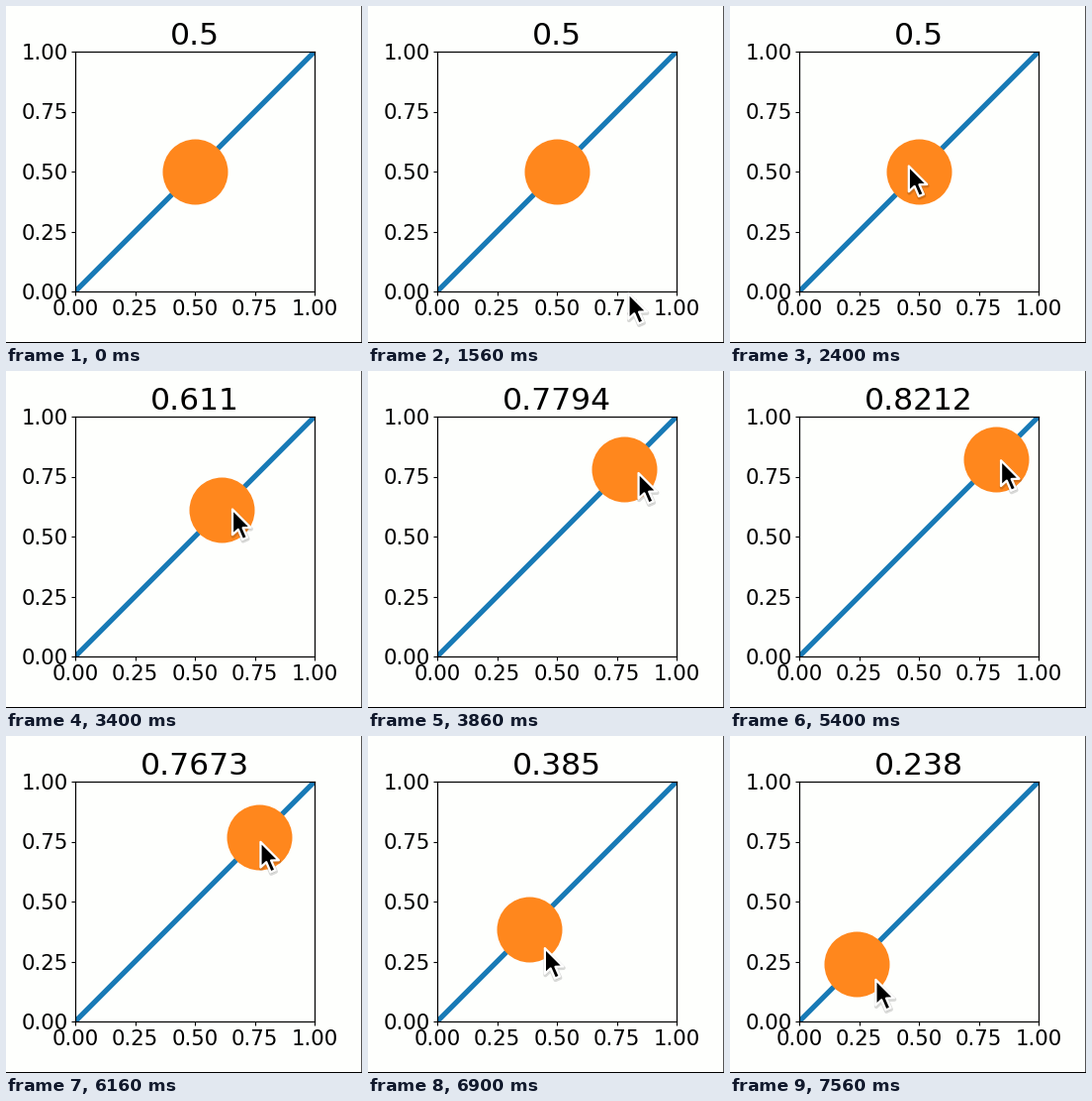
A matplotlib script that plays this animation: 360 by 340 pixels, repeating every 8 s.

```python
import numpy as np
import matplotlib.pyplot as plt
from matplotlib.animation import FuncAnimation
from matplotlib.patches import Polygon

WIDTH, HEIGHT, DPI = 360, 340, 72  # at 72 dpi one point is one pixel
LEFT, BOTTOM, SIDE = 70, 288, 242  # plot square, y measured downwards
LOOP, INTERVAL = 8000, 20
PAPER, BLUE, ORANGE = "#fefffd", "#187ab6", "#ff871d"

# (ms, value): two drags of the disc, up the line and back down
DRAGS = [(2990, 0.5), (3400, 0.611), (4100, 0.8212),
         (5860, 0.8212), (6160, 0.7673), (6630, 0.55), (6900, 0.385), (7560, 0.238)]
LEAD = 50  # ms by which the disc trails the pointer
ARROW = 0.97 * np.array([(0, 0), (0, 26.5), (6, 21), (10.5, 31.5), (15.5, 29.3),
                         (11, 19.3), (19, 19)]) + (-0.2, 1.5)


def progress(t, start, end):
    return np.clip((t - start) / (end - start), 0, 1)


def ramp(t, start, end):
    u = progress(t, start, end)
    return u * u * (3 - 2 * u)


def monotone_curve(keys):
    """Cubic curve through (time, value) keys without overshoot."""
    times, values = np.transpose(keys)
    slopes = np.diff(values) / np.diff(times)
    tangents = np.zeros_like(values)
    for i, (a, b) in enumerate(zip(slopes, slopes[1:]), 1):
        tangents[i] = 2 * a * b / (a + b) if a * b > 0 else 0

    def at(t):
        i = np.clip(np.searchsorted(times, t, side="right") - 1, 0, len(times) - 2)
        u = progress(t, times[i], times[i + 1])
        ease = u * u * (3 - 2 * u)
        bend = u * (1 - u) * ((1 - u) * tangents[i] - u * tangents[i + 1])
        return (values[i] * (1 - ease) + values[i + 1] * ease
                + (times[i + 1] - times[i]) * bend)

    return at


value_at = monotone_curve(DRAGS)


def pointer_at(t):
    """Tip of the pointer: it holds the disc and drifts across the line."""
    value = value_at(t + LEAD)
    grip = np.array([LEFT + SIDE * value + 3, BOTTOM - SIDE * value - 3])
    drift = (2.5 + 7 * (ramp(t, 3000, 4100) - ramp(t, 4360, 5430))
             + 14.5 * ramp(t, 6160, 6950))
    enter = (1 - progress(t, 1420, 2260)) ** 2 * np.array([119, 185])
    settle = (1 - ramp(t, 2400, 2560)) * np.array([-15.5, -6.5])
    stray = (ramp(t, 4340, 4580) - ramp(t, 4600, 5250)) * np.array([-4, 89])
    return grip + drift + enter + settle + stray


def title_text(value):
    return f"{value:.{4 if value > 0.7 else 3}g}"


plt.rcParams["font.family"] = "DejaVu Sans"
fig = plt.figure(figsize=(WIDTH / DPI, HEIGHT / DPI), dpi=DPI, facecolor=PAPER)

ax = fig.add_axes([LEFT / WIDTH, 1 - BOTTOM / HEIGHT, SIDE / WIDTH, SIDE / HEIGHT],
                  facecolor=PAPER)
ax.set(xlim=(0, 1), ylim=(0, 1))
ticks = np.linspace(0, 1, 5)
labels = [f"{tick:.2f}" for tick in ticks]
ax.set_xticks(ticks, labels)
ax.set_yticks(ticks, labels)
ax.tick_params(labelsize=21.3, length=4, width=1.1)
ax.tick_params(axis="x", pad=4.5)
ax.tick_params(axis="y", pad=3.2)
for spine in ax.spines.values():
    spine.set_linewidth(1.2)
ax.plot([0, 1], [0, 1], color=BLUE, lw=5.2)
disc, = ax.plot([0.5], [0.5], "o", color=ORANGE, ms=66, mew=0)
title = ax.set_title("0.5", fontsize=31.4, pad=7.4, y=1)

stage = fig.add_axes([0, 0, 1, 1])
stage.set(xlim=(0, WIDTH), ylim=(HEIGHT, 0))
stage.axis("off")
shadow = Polygon(ARROW, fc="black", ec="black", lw=4, alpha=0.15, joinstyle="round")
arrow = Polygon(ARROW, fc="black", ec="white", lw=2.3, joinstyle="round")
for patch in (shadow, arrow):
    stage.add_patch(patch)
stage.plot([WIDTH - 1] * 2, [0, HEIGHT], color="#555555", lw=1, zorder=5)
stage.plot([0, WIDTH], [HEIGHT - 1] * 2, color="black", lw=1, zorder=5)


def update(frame):
    t = frame * INTERVAL
    value = value_at(t)
    disc.set_data([value], [value])
    title.set_text(title_text(value))
    tip = pointer_at(t)
    arrow.set_xy(ARROW + tip)
    shadow.set_xy(ARROW + tip + (0.5, 1.5))
    return disc, title, shadow, arrow


animation = FuncAnimation(fig, update, frames=LOOP // INTERVAL,
                          interval=INTERVAL, repeat=True, repeat_delay=0)
plt.show()
```
